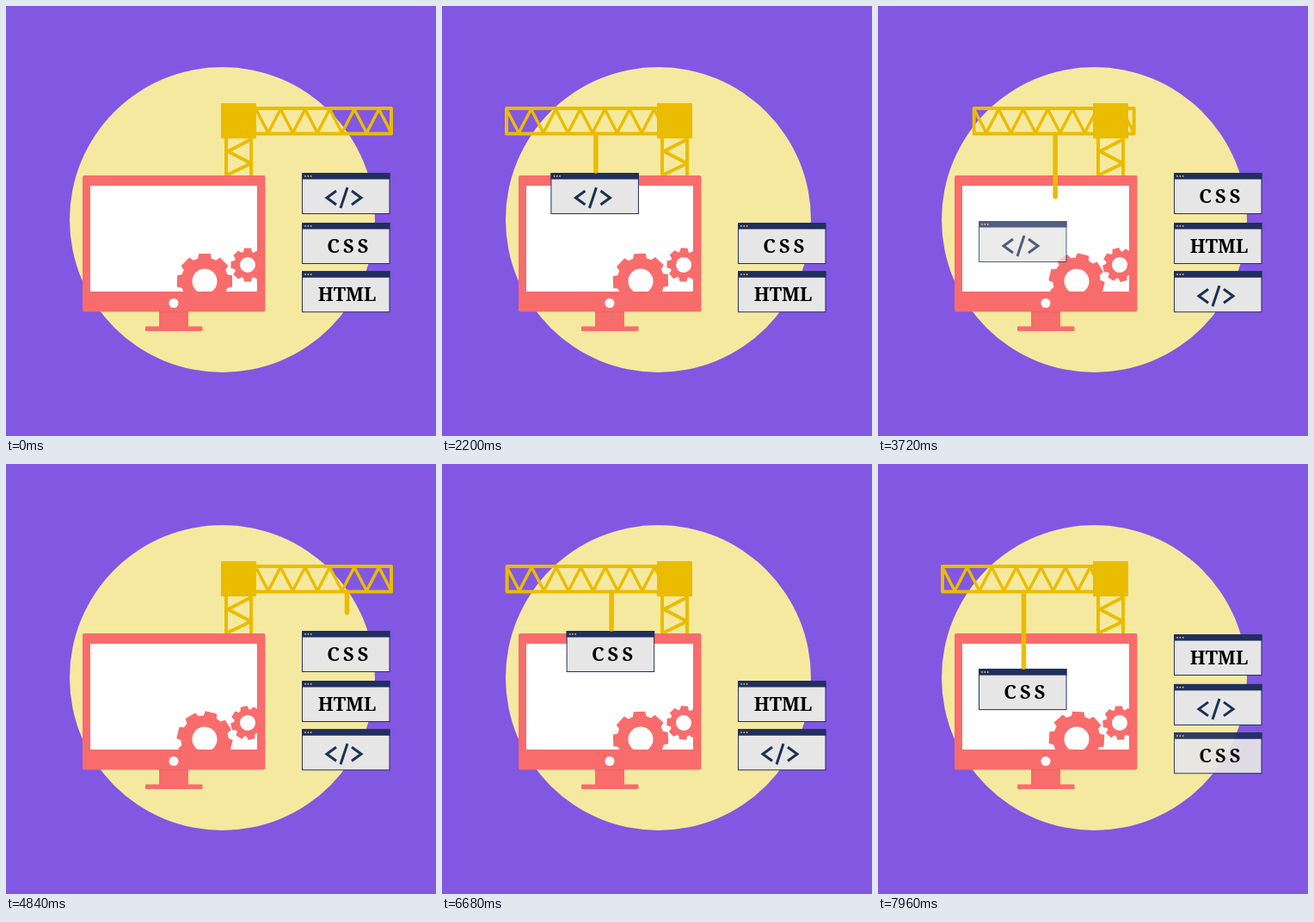
Write an HTML page that moves like this. It is 500 px wide and 500 px high and loops after 8 s.

```html
<!DOCTYPE html>
<html lang="en">
<head>
<meta charset="utf-8">
<title>Building a page</title>
<style>
  html, body { margin: 0; width: 100%; height: 100%; overflow: hidden; background: #8257e2; }
  svg { display: block; width: 100%; height: 100%; }
  text { font: 700 22px "Noto Serif", serif; text-anchor: middle; fill: #000; }
  .red { fill: #f86c6c; }
  .gold { fill: none; stroke: #eabc00; stroke-width: 4; stroke-linejoin: round; }
</style>
</head>
<body>
<svg viewBox="0 0 500 500">
  <defs>
    <clipPath id="screen"><rect x="98" y="209" width="194" height="123"/></clipPath>
    <g id="window">
      <rect x=".5" y=".5" width="101.5" height="47" fill="#e6e6e6" stroke="#212f5e"/>
      <rect width="102.5" height="7.5" fill="#212f5e"/>
      <g fill="#f0d27a">
        <circle cx="4" cy="3.8" r=".9"/><circle cx="7.3" cy="3.8" r=".9"/><circle cx="10.6" cy="3.8" r=".9"/>
      </g>
    </g>
    <g id="card0">
      <use href="#window"/>
      <path d="M40 21L29 29L40 37M53 17L45 41M58 21L69 29L58 37" fill="none" stroke="#1b3153" stroke-width="3"/>
    </g>
    <g id="card1">
      <use href="#window"/>
      <text x="55.5" y="34.5" letter-spacing="4">CSS</text>
    </g>
    <g id="card2">
      <use href="#window"/>
      <text x="52.5" y="34.5">HTML</text>
    </g>
  </defs>

  <rect width="500" height="500" fill="#8257e2"/>
  <circle cx="251.5" cy="248.5" r="177.5" fill="#f5e99f"/>

  <path class="gold" d="M256 150V200M285 150V200M285 155L258 169L285 183L258 196"/>
  <g id="jib" class="gold">
    <rect x="262" y="119" width="186" height="29.5"/>
    <path id="truss" stroke-width="3.5"/>
  </g>
  <rect x="250" y="113" width="41" height="41" fill="#eabc00"/>

  <rect class="red" x="178" y="354" width="34" height="20"/>
  <rect class="red" x="162" y="372.5" width="66.5" height="5.5" rx="1"/>
  <rect class="red" x="89" y="197" width="212.5" height="158.5" rx="2"/>
  <path d="M178 355.7H212" stroke="#e26262" stroke-width=".8"/>
  <rect x="98" y="209" width="194" height="123" rx="1" fill="#fff"/>
  <circle cx="195" cy="345.5" r="5.5" fill="#fff"/>
  <g clip-path="url(#screen)">
    <path id="big" class="red" fill-rule="evenodd"/>
    <path id="small" class="red" fill-rule="evenodd"/>
  </g>

  <use id="slot1"/>
  <use id="slot2"/>
  <use id="slot3"/>
  <use id="load"/>
  <path id="rope" fill="none" stroke="#eabc00" stroke-width="5.5" stroke-linecap="round"/>
</svg>
<script>
  const LOOP = 8000, CYCLE = 4640;
  const TOPS = [194, 252, 308.3, 365];
  const TRAVEL = 187, EXTRA = 40;
  const $ = id => document.getElementById(id);
  const lin = (t, a, b) => Math.min(1, Math.max(0, (t - a) / (b - a)));
  const ease = (t, a, b) => { const u = lin(t, a, b); return u * u * (3 - 2 * u); };
  const move = (el, x, y) => el.setAttribute('transform', `translate(${x} ${y})`);
  const spin = (el, x, y, deg) => el.setAttribute('transform', `translate(${x} ${y}) rotate(${deg})`);

  // Eight-toothed wheel with a round hole, centred on the origin
  function gear(outer, body, hole, half) {
    const pts = [];
    for (let i = 0; i < 8; i++) {
      const a = i * Math.PI / 4;
      const at = (x, y) => pts.push(
        (x * Math.cos(a) - y * Math.sin(a)).toFixed(2) + ' ' +
        (x * Math.sin(a) + y * Math.cos(a)).toFixed(2));
      at(-half - 1, -body);
      at(-half, -outer);
      at(half, -outer);
      at(half + 1, -body);
    }
    return `M${pts.join('L')}ZM${-hole} 0a${hole} ${hole} 0 1 0 ${2 * hole} 0a${hole} ${hole} 0 1 0 ${-2 * hole} 0Z`;
  }

  function truss() {
    let d = 'M262 120';
    for (let i = 1; i <= 13; i++) d += `L${(262 + i * 14.3).toFixed(1)} ${i % 2 ? 147.5 : 120}`;
    return d;
  }

  $('big').setAttribute('d', gear(32, 26.5, 14.5, 6.8));
  $('small').setAttribute('d', gear(19.5, 15, 9, 4));
  $('truss').setAttribute('d', truss());

  function show(id, card, x, y, opacity) {
    const el = $(id);
    el.setAttribute('href', '#card' + card % 3);
    el.setAttribute('opacity', opacity);
    move(el, x, y);
  }

  function draw(time) {
    const first = Math.floor(time / CYCLE), t = time % CYCLE;

    const jib = TRAVEL * (ease(t, 560, 2090) - ease(t, 3490, 4300));
    const trolley = jib + EXTRA * (ease(t, 1840, 2366) - ease(t, 4000, 4500));
    const lower = 56 * lin(t, 2649, 3500);
    const rope = 149 + 45 * ease(t, 0, 366) + lower - 101 * ease(t, 3490, 4180);

    move($('jib'), -jib, 0);
    $('rope').setAttribute('d', `M${396.5 - trolley} 149V${rope - 2}`);
    $('rope').setAttribute('visibility', rope > 151 ? 'visible' : 'hidden');

    // The load stays on the screen once it is set down
    const loadX = t < 3490 ? 344 - trolley : 344 - TRAVEL - EXTRA;
    show('load', first, loadX, TOPS[0] + lower, 1 - ease(t, 3500, 4220));

    const up = lin(t, 2622, 3372);
    for (let i = 1; i <= 3; i++) {
      const y = TOPS[i] + (TOPS[i - 1] - TOPS[i]) * up;
      show('slot' + i, first + i, 344, y, i < 3 ? 1 : up);
    }

    const turn = time * 0.04;
    spin($('big'), 231, 320, turn);
    spin($('small'), 281, 301, -turn);
  }

  let start = null;
  function tick(now) {
    if (start === null) start = now;
    draw((now - start) % LOOP);
    requestAnimationFrame(tick);
  }
  draw(0);
  requestAnimationFrame(tick);
</script>
</body>
</html>
```
